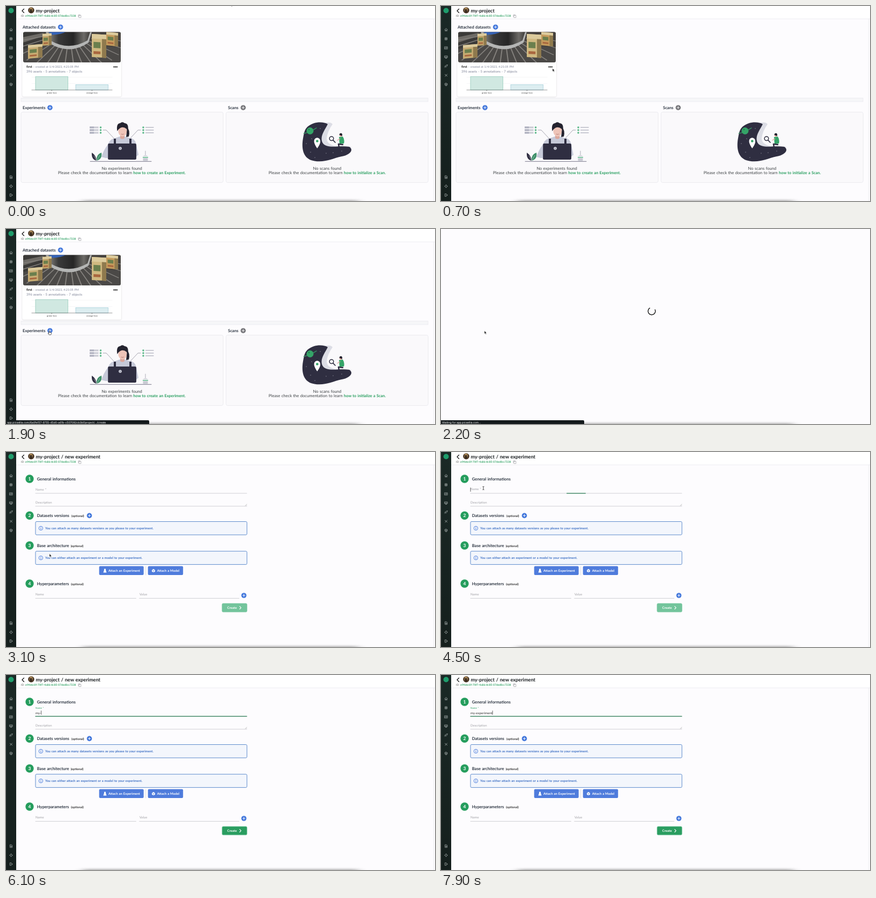
Write an HTML page that moves like this. It is 800x363 px and loops after 8 s.

```html
<!DOCTYPE html>
<html lang="en">
<head>
<meta charset="utf-8">
<title>New experiment</title>
<style>
  html, body { margin: 0; width: 100%; height: 100%; overflow: hidden; background: #fdfcfe; }
  svg { display: block; width: 100vw; height: 100vh; }
  text { font: 6.1px Lato, "Open Sans", sans-serif; word-spacing: .06em; fill: #3c4043; text-rendering: geometricPrecision; white-space: pre; }
  .b { font-weight: 700; }
  .h { font-weight: 700; font-size: 7.65px; fill: #2b3440; }
  .ui { font: 5px Inter, sans-serif; fill: #fff; word-spacing: 0; }
  .ln { fill: none; stroke-linecap: round; stroke-linejoin: round; }
</style>
</head>
<body>
<svg id="stage" viewBox="0 0 800 363" preserveAspectRatio="none"></svg>
<script>
const GREEN = '#259d5d', BLUE = '#4478dc', INK = '#2f2e41', GRAY = '#a3a3a8';

const rect = (x, y, w, h, fill, more = '') => `<rect x="${x}" y="${y}" width="${w}" height="${h}" fill="${fill}" ${more}/>`;
const circle = (x, y, r, fill, more = '') => `<circle cx="${x}" cy="${y}" r="${r}" fill="${fill}" ${more}/>`;
const shape = (d, fill, more = '') => `<path d="${d}" fill="${fill}" ${more}/>`;
const line = (d, color, w = 1, more = '') => `<path class="ln" d="${d}" stroke="${color}" stroke-width="${w}" ${more}/>`;
const text = (x, y, s, size, fill, cls = '', more = '') =>
  `<text x="${x}" y="${y}" class="${cls}" style="${size ? `font-size:${size}px;` : ''}${fill ? `fill:${fill}` : ''}" ${more}>${s}</text>`;
const plus = (x, y, fill = BLUE) => circle(x, y, 4.8, fill) + line(`M${x - 2.2} ${y}h4.4M${x} ${y - 2.2}v4.4`, '#fff', .9);
const heading = (x, y, s) => text(x, y, s, 0, '', 'h');

function sidebar() {
  const icons = [
    [44, 'M-3 0L0-3L3 0M-2 0V3H-.6V1H.6V3H2V0'],
    [61, 'M-2-2.5H2V2.5H-2ZM-2-.8H2M-2 .9H2'],
    [78, 'M-3-2.5H3V2.5H-3ZM-2 1L-.5-1L.5 1L2-1'],
    [95, 'M-3-2.5H3V1.3H-3ZM-1.3 2.8H1.3M-2 0H2'],
    [112, 'M3-3Q-1-3-2 1L0 2Q3 0 3-3M-2-.5L-3 1M-2 2L-3 3'],
    [129, 'M-2.5-2L0 0L2.5-2.5M0 0L-2 2.5M0 0L2.5 2'],
    [146, 'M0-3L2.6-1.5V1.5L0 3L-2.6 1.5V-1.5ZM-2.6-1.5L0 0L2.6-1.5M0 0V3'],
    [318.5, 'M-2-3H1L2.3-1.5V3H-2ZM-.8 0H1M-.8 1.5H1'],
    [335.5, 'M0-2.4A2.4 2.4 0 1 1-.1-2.4M0-3.1V-2M0 2V3.1M-3.1 0H-2M2 0H3.1'],
    [352, 'M.5-2.8H-2.6V2.8H.5M-.5 0H3M1.6-1.4L3 0L1.6 1.4']];
  return rect(0, 0, 19, 363, 'url(#side)') + circle(9.5, 8.5, 5, '#1f9d6c') +
    icons.map(([y, d]) => line(d, '#98a09f', 1, `transform="translate(9.5 ${y}) scale(.85)"`)).join('');
}

function header() {
  return rect(19, 0, 781, 24, '#fff') + line('M19 24H800', '#e9e8ec', .8) + line('M797.3 24V363', '#ededf0', .8) +
    line('M33.5 5.5L30 9L33.5 12.5', '#111', 1.3) +
    circle(47, 8, 5.8, '#4b3826') + shape('M44 3.5Q48 1.5 50 5L49 9Q47 13 44 10Z', '#a58455') + shape('M45 6h3v6h-3z', '#2b2119') +
    text(28, 20.4, 'ID :', 5, '#555') +
    text(36.3, 20.4, 'e94dec0f-70f7-4a86-8c85-07ded8cc7238', 4.98, '#35a468', 'b') +
    line('M135 20V16.5H138.5M136.3 17.6H139.8V21.6H136.3Z', '#8a8a90', .6);
}

function photo() {
  // A carton leaning by skew degrees, with a lighter lid, a shaded side and a printed label.
  const carton = (x, y, w, h, skew, front) => `<g transform="translate(${x} ${y}) skewY(${skew})">` +
    rect(0, 0, w, h, front) + rect(0, 0, w, h * .2, '#dccb9c') + rect(w * .7, h * .2, w * .3, h * .8, '#8f7a4e') +
    rect(w * .12, h * .34, w * .48, h * .26, '#6b7f4d') + rect(w * .12, h * .74, w * .48, h * .12, '#a9673f') + '</g>';
  let slats = '';
  for (let a = -75; a <= 75; a += 10)
    slats += `<path d="M0 30V75" stroke="#85827e" stroke-width="1.3" transform="translate(118 48) scale(1.5 1) rotate(${a})"/>`;
  return `<g clip-path="url(#photo)">` + rect(32, 48, 182, 57, '#4b4947') +
    shape('M32 48H84V70L32 80Z', '#3b3a38') + shape('M32 58L70 50V56L32 68Z', '#6e6b66') +
    shape('M152 48H214V78L160 72Z', '#45413d') + slats +
    shape('M74 48H160L154 68Q120 92 82 70Z', '#b5b6b5') + shape('M78 48H157L152 64Q118 84 84 65Z', 'url(#drum)') +
    shape('M80 48H112Q98 55 82 53Z', '#3563b8') +
    carton(68, 52, 17, 22, -4, '#bfa168') + carton(41, 73, 27, 25, -5, '#c6ab72') +
    carton(187, 48, 22, 25, 6, '#c49a5c') + carton(160, 52, 27, 43, 3, '#d0b981') + '</g>';
}

function datasetCard() {
  return rect(30.5, 48.5, 184.5, 120, '#fff', 'rx="3" filter="url(#soft)"') + photo() +
    text(38, 115, 'first', 6.1, '#222', 'b') +
    text(51, 115, '- created at 1/4/2023, 4:21:05 PM', 5.43, '#7d8296') +
    text(38, 124.3, '396 assets - 5 annotations - 7 objects', 6.18, '#7d8296') +
    [201.4, 204.1, 206.8].map(x => circle(x, 113.4, 1.15, '#111')).join('') +
    line('M48 132.5H198M48 144.3H198', '#eeeef2', .6) +
    rect(55, 131.3, 60.5, 25, '#d0e8e1', 'stroke="#8cc7b6" stroke-width=".7"') +
    rect(130, 146.3, 60.5, 10, '#dcedf0', 'stroke="#9ccbd8" stroke-width=".7"') +
    line('M48 156.3H198M85.3 156.3v2M160.3 156.3v2', '#555', .6) +
    text(85.3, 163.2, 'green-box', 3.8, '#444', 'ui', 'text-anchor="middle"') +
    text(160.3, 163.2, 'orange-box', 3.8, '#444', 'ui', 'text-anchor="middle"');
}

function deskArt() {
  const rows = [226, 231, 236].map(y =>
    rect(156, y - 1.5, 16.5, 3, '#c9cad3') + rect(156, y - 1.5, 8, 3, '#aeb0be') + circle(176.5, y, 1.8, '#5cb889') +
    circle(256, y, 1.8, '#5cb889') + rect(260, y - 1, 15.5, 2, '#c9cad3')).join('');
  return rows +
    line('M181 231H187L201 246M251 231H246L232 246', '#6c6c7c', .6) +
    shape('M226 226Q232 232 229 243L224 244Z', '#24232f') +
    shape('M178 281Q182 268 190 258Q194 247 203 246L212 243H222L232 246Q241 247 243 258L247 277L240 283H186Z', '#c6c9d8') +
    shape('M213 238H221V246Q217 249 213 246Z', '#dba79c') +
    shape('M209.5 228Q217 222 225 228V235Q224 242 217.3 243Q211 242 209.5 235Z', '#eec4b8') +
    shape('M207.5 233Q205 219 213 218Q217 214.5 221 218Q230 219 227 233L225 229Q217 222 209.5 230Z', '#24232f') +
    line('M215 238.5Q217 240 219.5 238.5', '#8d4e4a', .6) +
    shape('M201 247H205V257H230V247H234V283H201Z', INK) +
    rect(190, 256, 53, 30, INK, 'rx="2.5"') + circle(213, 265, 2.8, '#d9dae3') + circle(213, 265, 1.5, '#9a9cac') +
    line('M190.5 258V283', '#53526a', .8) + line('M157 289.3H271', '#3f3d56', .7) +
    shape('M169 288Q159 286 160 273Q168 278 169 288Z', INK) + shape('M169 288Q168 276 178 273Q180 285 169 288Z', '#3c8f68') +
    line('M164 279L169 288L175 278', '#e8e8ee', .5) +
    shape('M255 280Q260 274.5 265 280Z', '#d9d9e0') + rect(255, 281, 10, 1.5, '#5cb889') +
    rect(255.5, 283.3, 9, 5.5, '#c9cad3', 'rx="1"') + line('M260 277V270', '#77778a', .6);
}

function spaceArt() {
  return shape('M590 219Q604 214 609 220Q600 232 598 246Q598 258 616 261L645 262L620 270H580Z', '#dcdde5') +
    shape('M562 225C574 214 593 215 600 220C594 232 585 242 590 254C597 267 620 259 640 262C650 268 640 278 626 280C608 284 594 292 575 288.5C552 285 551 262 554 246C556 235 557 230 562 225Z', INK) +
    [[560, 256], [568, 272], [586, 228], [597, 274], [610, 273], [576, 282], [626, 270], [570, 247]].map(([x, y]) => circle(x, y, .55, '#d5d5e0')).join('') +
    circle(567, 232.5, 6.5, '#35a468') + line('M555 237Q565 236 579 227', '#35a468', 1.2) + circle(565, 230, 1.3, '#23794a') +
    shape('M580.3 265Q574 256 574.6 251A5.7 5.7 0 0 1 586 251Q587 256 580.3 265Z', '#fff') + circle(580.3, 251.5, 2.3, '#35a468') +
    circle(607, 246.8, 3.8, '#fff', `stroke="${INK}" stroke-width="1.5"`) + line('M610 249.8L614 254', INK, 1.7) +
    circle(624.5, 240.5, 2.6, '#e3a79b') + shape('M621.5 240Q622 236 626 237Q628 239 627 242Z', '#24232f') +
    shape('M621 244L628 243Q632 249 630 256L622 257Z', '#35a468') + line('M628 258L620 257L622 268', INK, 2.5) +
    line('M623 247L618 250', '#e3a79b', 1.3);
}

function emptyPanel(x, cx, kind, how, art) {
  return rect(x, 197.5, 377, 131, '#faf9fb', 'rx="3" stroke="#e8e8ec" stroke-width=".8"') + art +
    text(cx, 304.8, `No ${kind} found`, 7.63, '', '', 'text-anchor="middle"') +
    text(cx, 313.4, `Please check the documentation to learn <tspan fill="${GREEN}" style="font-weight:700;font-size:7.35px">${how}.</tspan>`, 7.6, '', '', 'text-anchor="middle"');
}

function overview() {
  return text(55.5, 11.9, 'my-project', 9.1, '#161a1d', 'b') +
    heading(31, 41.6, 'Attached datasets') + plus(101.7, 39.2) + datasetCard() +
    rect(28, 171.3, 759, 6.7, '#f6f6f8', 'stroke="#e9e9ed" stroke-width=".7"') +
    heading(31, 191.6, 'Experiments') + plus(82, 189.2) +
    heading(414, 191.6, 'Scans') + plus(442.3, 189.2, '#77777b') +
    emptyPanel(28, 216, 'experiments', 'how to create an Experiment', deskArt()) +
    emptyPanel(410.3, 599, 'scans', 'how to initialize a Scan', spaceArt());
}

function form() {
  const step = (n, y, title, optX) => circle(44, y, 7.7, GREEN) +
    text(44, y + 3, n, 8.5, '#fff', 'b', 'text-anchor="middle"') + heading(57.8, y + 2.5, title) +
    (optX ? text(optX, y + 2.5, '(optional)', 5.65, '#333', 'b') : '');
  const info = (y, s) => rect(55, y, 394.3, 24.7, '#f3f6fc', 'rx="2" stroke="#4c7fc8" stroke-width=".9"') +
    circle(65, y + 12.4, 3.7, 'none', `stroke="${BLUE}" stroke-width=".9"`) + line(`M65 ${y + 11.8}v2.4M65 ${y + 10.3}v.1`, BLUE, .9) +
    text(73, y + 14.2, s, 5.95, '#3e70c4', 'b');
  const button = (x, w, tx, s) => rect(x, 212.6, w, 16.4, '#4f7cdc', 'rx="2"') + text(tx, 222.7, s, 6.06, '#fff', 'b');
  const rule = (x, y, w) => line(`M${x} ${y}h${w}`, '#c4c4c9', .8);
  return text(55.5, 11.9, 'my-project / new experiment', 9.13, '#161a1d', 'b') +
    step(1, 50, 'General informations') + rule(55, 76.9, 394) +
    text(55, 96.3, 'Description', 6, GRAY) + rule(55, 100.9, 394) + line('M446 100L449 97M447.7 100L449 98.7', '#999', .5) +
    step(2, 118.3, 'Datasets versions', 122) + plus(155.5, 118.4) +
    info(129.5, 'You can attach as many datasets versions as you please to your experiment.') +
    step(3, 174, 'Base architecture', 120.7) +
    info(184.7, 'You can either attach an experiment or a model to your experiment.') +
    button(173.7, 83, 191, 'Attach an Experiment') + shape('M183 217.5H186V219.5L187.5 224.5H181.5L183 219.5Z', '#fff') +
    line('M260.7 213V229', '#d5d5da', .8) +
    button(264.7, 65.5, 281.7, 'Attach a Model') + shape('M275 217.8L278 219.4V222.6L275 224.3L272 222.6V219.4Z', '#fff') +
    line('M272 219.4L275 221L278 219.4M275 221V224', '#4f7cdc', .6) +
    step(4, 245, 'Hyperparameters', 121.2) +
    text(55, 267.4, 'Name', 6.1, GRAY) + rule(55, 272.4, 187.5) +
    text(248.7, 267.4, 'Value', 6.1, GRAY) + rule(248.7, 272.4, 186) + plus(443.6, 267) +
    rect(403, 282, 46.3, 15.8, '#73c49c', 'id="create" rx="2" stroke="#73c49c" stroke-width=".8"') +
    text(412.5, 292.2, 'Create', 6.1, '#fff', 'b') + line('M435.8 287.3L438.3 289.9L435.8 292.5', '#fff', 1.1) +
    line('', '#2c8058', 1.2, 'id="focus"') + text(55, 71.2, 'Name *', 6.1, GRAY, '', 'id="label"') +
    text(55, 72.7, '', 6.12, '#333', '', 'id="typed"') + rect(0, 66.3, .7, 7.6, '#222', 'id="caret"') +
    `<g id="menu">` + rect(96, 82, 95.5, 94, '#1c1d1f', 'rx="2.5"') + shape('M101.5 82.3L105 78.6L108.5 82.3Z', '#1c1d1f') +
    ['covid_classification', 'ujh', 'grape-detection-experiement', 'grape-detection-experiement-2', 'object-detection-experiment', 'experiment-3']
      .map((s, i) => text(101, 93.3 + i * 15.1, s, 6.1, '#f2f2f2')).join('') + '</g>';
}

const $ = id => document.getElementById(id);
$('stage').innerHTML = `<defs>
  <linearGradient id="side" x2="0" y2="1"><stop stop-color="#1b2926"/><stop offset="1" stop-color="#151f1d"/></linearGradient>
  <linearGradient id="drum"><stop stop-color="#8d8b86"/><stop offset=".25" stop-color="#3a3a3a"/><stop offset=".6" stop-color="#262626"/><stop offset=".85" stop-color="#6d6b67"/><stop offset="1" stop-color="#3d3b38"/></linearGradient>
  <clipPath id="photo"><rect x="32" y="48.5" width="182" height="56.5" rx="3"/></clipPath>
  <filter id="dock" x="-10%" y="-200%" width="120%" height="500%"><feGaussianBlur stdDeviation="8 2"/></filter>
  <filter id="soft"><feDropShadow dx="0" dy=".5" stdDeviation="1" flood-opacity=".18"/></filter></defs>` +
  rect(0, 0, 800, 363, '#fdfcfe') +
  `<g id="chrome">${header()}${sidebar()}</g><g id="overview">${overview()}</g><g id="form">${form()}</g>` +
  line('M399.2 150.2A6.8 6.8 0 1 1 389.2 147.2', '#111', 1.4, 'id="spinner"') +
  rect(143, 362, 514, 8, '#555', 'opacity=".6" filter="url(#dock)"') +
  `<g id="status">${shape('M0 356H265Q267 356 267 358V363H0Z', '#141a1c')}${text(2, 361.5, '', 0, '', 'ui', 'id="url"')}</g>` +
  `<g id="cursor">${shape('M0 0V5.8L1.4 4.6L2.4 6.8L3.4 6.3L2.4 4.2H4.2Z', '#111', 'id="arrow" stroke="#fff" stroke-width=".5"')}` +
  shape('M-.8 .8Q0 -.6.8 .8V3Q3.6 2.6 3.6 4.4Q3.5 6.8 2.6 7.4H-.8L-2.8 4.6Q-2.6 3.6 -.8 4.7Z', '#fff', 'id="hand" stroke="#111" stroke-width=".7"') +
  line('M-1.2-3Q0-3 0-2.4Q0-3 1.2-3M0-2.4V2.4M-1.2 3Q0 3 0 2.4Q0 3 1.2 3', '#222', .8, 'id="beam"') + '</g>';

const LOOP = 8000, LEAVE = 2100, READY = 2800, FOCUS = 4436, MENU = 4800;
const KEYS = [5500, 5700, 5900, 7000, 7300, 7500, 7600, 7600, 7700, 7700, 7800, 7800, 7900];
const ease = (t, from, to) => { const p = Math.min(1, Math.max(0, (t - from) / (to - from))); return p * p * (3 - 2 * p); };
const mix = (a, b, p) => a + (b - a) * p;
const show = (id, on) => $(id).style.display = on ? '' : 'none';

function draw(t) {
  const ready = t >= READY, count = KEYS.filter(k => t >= k).length;
  show('chrome', t < LEAVE || ready);
  show('overview', t < LEAVE);
  show('form', ready);
  show('spinner', t >= LEAVE && !ready);
  $('spinner').setAttribute('transform', `rotate(${(t - 2200) * .36} 393 153)`);

  show('status', t >= 1200 && !ready);
  $('url').textContent = t < LEAVE
    ? 'app.picsellia.com/6a0fe157-9755-45d0-a61b-c507082cb3bf/project/.../create'
    : 'Waiting for app.picsellia.com...';

  const f = ease(t, FOCUS, FOCUS + 350);
  show('focus', f > 0);
  $('focus').setAttribute('d', `M${252 - 197 * f} 76.9H${252 + 197 * f}`);
  const label = $('label');
  label.setAttribute('y', mix(71.9, 63.2, f));
  label.style.fontSize = mix(6.1, 4.6, f) + 'px';
  label.style.fill = f > .5 ? GREEN : GRAY;

  $('typed').textContent = 'my-experiment'.slice(0, count);
  const since = t - (count ? KEYS[count - 1] : FOCUS);
  show('caret', t >= FOCUS && since % 1000 < 500);
  $('caret').setAttribute('x', 55 + (ready && count ? $('typed').getComputedTextLength() : -.3));
  $('create').setAttribute('fill', count ? '#2a9d60' : '#73c49c');
  show('menu', t >= MENU && !count);

  const a = ease(t, 0, 1200), b = ease(t, 3100, 4200);
  const x = mix(mix(418.5, 81, a), 79, b), y = mix(mix(-5.5, 189.5, a), 67.3, b);
  const hand = t >= 1200 && t < LEAVE, beam = ready && y < 76;
  $('cursor').setAttribute('transform', `translate(${x} ${y})`);
  show('cursor', !count);
  show('hand', hand);
  show('beam', beam);
  show('arrow', !hand && !beam);
}

let start;
function tick(now) {
  start ??= now;
  draw(Math.floor((now - start) % LOOP / 100) * 100);
  requestAnimationFrame(tick);
}
draw(0);
requestAnimationFrame(tick);
</script>
</body>
</html>
```
